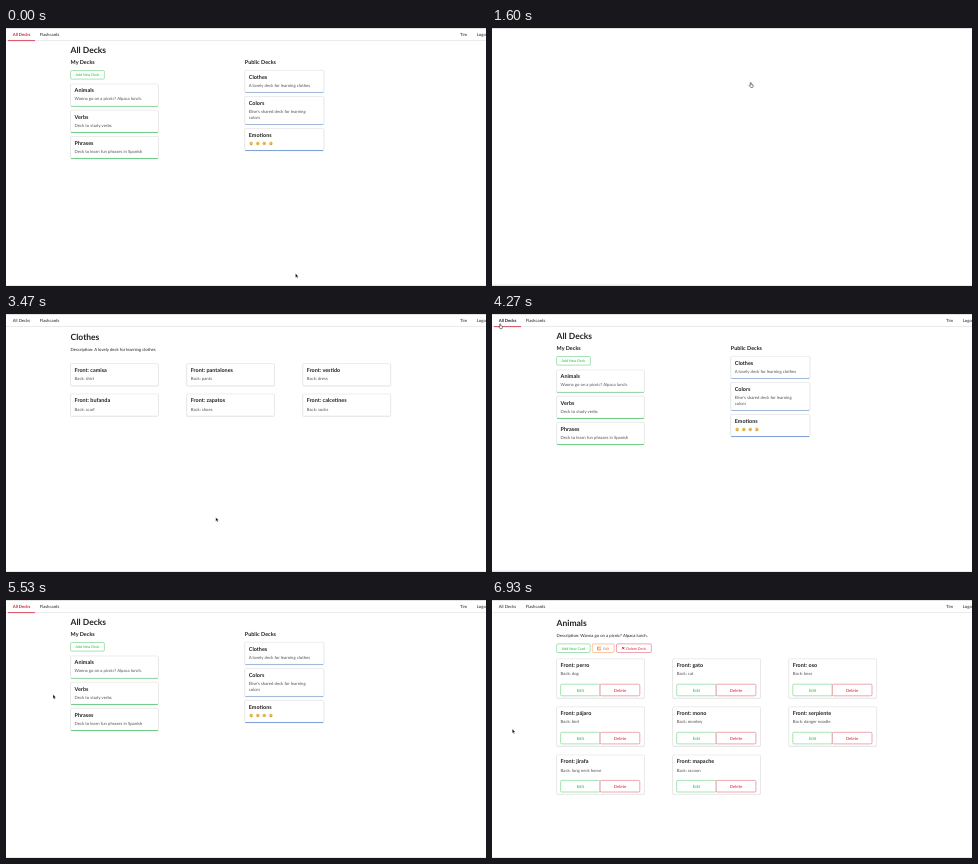
These frames come from a looping animation (480x258 px, 8.99 s). An HTML page:

```html
<!DOCTYPE html>
<html lang="en">
<head>
<meta charset="utf-8">
<title>Flashcard decks</title>
<style>
html, body { margin: 0; height: 100%; overflow: hidden; background: #fff; }
svg { display: block; width: 100vw; height: 100vh; }
text { font-family: Lato, "Open Sans", sans-serif; text-rendering: geometricPrecision; white-space: pre; }
</style>
</head>
<body>
<svg id="stage" viewBox="0 0 480 258"></svg>
<script>
const LOOP = 8990, STEP = 1000 / 15;
const GREEN = '#21ba45', RED = '#d4213d', ORANGE = '#f2711c', BLUE = '#3a72c8';
const INK = '#212121', SOFT = '#525252', LINE = '#d4d4d5';
const LEFT = 64.6, RIGHT = 238.8;
const stage = document.getElementById('stage');

const text = (x, y, s, size = 4.25, fill = INK, more = '') =>
  `<text x="${x}" y="${y}" font-size="${size}" fill="${fill}" ${more}>${s}</text>`;
const bold = (x, y, s, size = 5.46, fill = INK) => text(x, y, s, size, fill, 'font-weight="700"');
const rect = (x, y, w, h, fill, more = '') =>
  `<rect x="${x}" y="${y}" width="${w}" height="${h}" fill="${fill}" ${more}/>`;
const box = (x, y, w, h, color, width = .4) =>
  rect(x, y, w, h, '#fff', `rx="1.2" stroke="${color}" stroke-width="${width}"`);

function card(x, y, w, h, accent, lifted) {
  const shade = rect(x, y + .4, w, h, 'none',
    `rx="1.2" stroke="${lifted ? '#bcbdbd' : LINE}" stroke-width="1" opacity=".45"`);
  const edge = accent ? rect(x + .4, y + h - .1, w - .8, .65, accent, 'rx=".3" opacity=".8"') : '';
  return shade + box(x, y, w, h, LINE) + edge;
}

function button(x, y, w, h, label, color, size = 3.64, shift = 0) {
  return box(x, y, w, h, color) +
    text(x + w / 2 + shift, y + h / 2 + size * .36, label, size, color, 'text-anchor="middle"');
}

const decks = [
  [LEFT, 56, 87.8, 22, GREEN, 'Animals', 'Wanna go on a picnic? Alpaca lunch.'],
  [LEFT, 82.2, 87.8, 22, GREEN, 'Verbs', 'Deck to study verbs'],
  [LEFT, 108.4, 87.8, 22, GREEN, 'Phrases', 'Deck to learn fun phrases in Spanish'],
  [RIGHT, 42.3, 79, 22, BLUE, 'Clothes', 'A lovely deck for learning clothes'],
  [RIGHT, 68.5, 79, 27.8, BLUE, 'Colors', "Elise's shared deck for learning", 'colors'],
  [RIGHT, 100.4, 79, 22, BLUE, 'Emotions']
];
const inside = (p, [x, y, w, h]) => p.x > x && p.x < x + w && p.y > y && p.y < y + h;

function face(x, i) {
  const y = 115.4, bend = [1.3, -.3, -.7, .8][i];
  return `<circle cx="${x}" cy="${y}" r="1.85" fill="#f5d06c"/>
    <path d="M${x - 1} ${y - .5}h.6m.8 0h.6M${x - .9} ${y + .7}q.9 ${bend} 1.8 0" fill="none" stroke="#805622" stroke-width=".5"/>`;
}

function deckCard(deck, p) {
  const [x, y, w, h, accent, title, ...lines] = deck;
  const lifted = inside(p, deck);
  return `<g transform="translate(0 ${lifted ? -.9 : 0})">` + card(x, y, w, h, accent, lifted) +
    bold(x + 4, y + 8.4, title) +
    lines.map((s, i) => text(x + 4, y + 16.4 + i * 6, s, 4.25, SOFT)).join('') +
    (lines.length ? '' : [245.2, 251.8, 258.3, 264.9].map(face).join('')) + '</g>';
}

function nav(active, hovered) {
  const home = active ? bold(6.7, 8, 'All Decks', 4.25, hovered ? INK : RED) + rect(2, 12.3, 27, .8, RED)
    : text(6.7, 8, 'All Decks');
  return rect(0, 12.3, 480, .6, '#dedede') + home +
    text(33.8, 8, 'Flashcards') + text(454, 8, 'Tim') + text(470.8, 8, 'Logout');
}

const onNav = p => p.y < 13;

const deckPage = p => nav(true, onNav(p)) + bold(LEFT, 24.6, 'All Decks', 8.5) +
  bold(LEFT, 36.4, 'My Decks') + bold(RIGHT, 36.4, 'Public Decks') +
  button(LEFT, 42.5, 33.8, 8.6, 'Add New Deck', GREEN) +
  decks.map(d => deckCard(d, p)).join('');

const heading = (title, about) => nav() + bold(LEFT, 25.7, title, 8.5) + text(LEFT, 36.5, 'Description: ' + about);

// Words are "front/back" pairs laid out in three columns.
function wordCards(words, top, pitch, h, editable) {
  return words.split(',').map((pair, i) => {
    const [front, back] = pair.split('/');
    const x = LEFT + i % 3 * 116.1, y = top + Math.floor(i / 3) * pitch;
    return card(x, y, 87.8, h) + bold(x + 4, y + 8.4, 'Front: ' + front) +
      text(x + 4, y + 16.5, 'Back: ' + back, 4.25, SOFT) +
      (editable ? button(x + 4, y + 25.4, 39.5, 11.6, 'Edit', GREEN, 4.25) +
        button(x + 43.5, y + 25.4, 39.7, 11.6, 'Delete', RED, 4.25) : '');
  }).join('');
}

const clothesPage = () => heading('Clothes', 'A lovely deck for learning clothes') +
  wordCards('camisa/shirt,pantalones/pants,vestido/dress,bufanda/scarf,zapatos/shoes,calcetines/socks', 49.7, 30.3, 22);

const animalsPage = () => heading('Animals', 'Wanna go on a picnic? Alpaca lunch.') +
  button(LEFT, 43.9, 33.5, 8.6, 'Add New Card', GREEN) +
  button(100.3, 43.9, 21.8, 8.6, 'Edit', ORANGE, 3.64, 2.8) +
  `<path d="M107.5 47h-2v3h3v-1.4M106.8 48.8l2.3-2.4" fill="none" stroke="${ORANGE}" stroke-width=".7"/>` +
  button(124.5, 43.9, 34.9, 8.6, 'Delete Deck', RED, 3.64, 2.2) +
  `<path d="M130 47l2.4 2.4m0-2.4l-2.4 2.4" stroke="${RED}" stroke-width=".9"/>` +
  wordCards('perro/dog,gato/cat,oso/bear,pájaro/bird,mono/monkey,serpiente/danger noodle,jirafa/long neck horse,mapache/racoon',
    58.8, 48.1, 39.2, true);

const loadingPage = k => nav() + card(LEFT, 17.2, 340.4, 9) +
  `<g fill="none" stroke-width=".9"><circle cx="235" cy="18" r="4.4" stroke="#e3e3e3"/>
    <path d="M235 13.6a4.4 4.4 0 0 1 4.4 4.4" stroke="#767676" stroke-linecap="round" transform="rotate(${(k - 95) * 40} 235 18)"/></g>` +
  text(234.8, 29.6, 'Loading', 4.25, INK, 'text-anchor="middle"');

// First step of each view.
const views = [[0, deckPage], [24, null], [27, loadingPage], [30, clothesPage],
  [64, deckPage], [91, null], [94, loadingPage], [97, animalsPage]];

// Pointer stops: step, x, y.
const stops = [[0, 289.5, 245.5], [1, 289.5, 245.5], [4, 203.7, 160.7], [6, 203.7, 160.7],
  [17, 258.3, 54.5], [27, 258.3, 54.5], [32, 211, 205.5], [33, 209.8, 203.4], [52, 209.8, 203.4],
  [56, 78.7, 82.7], [58, 78.7, 82.7], [61, 7.7, 9.8], [74, 7.7, 9.8], [83, 47, 94.6],
  [86, 68, 88], [88, 69, 73.5], [93, 69, 73.5], [95, 66.7, 73.7], [104, 20.3, 129]];

function pointerAt(k) {
  const i = stops.findIndex(s => s[0] > k);
  if (i < 0) { const [, x, y] = stops.at(-1); return { x, y }; }
  const [k0, x0, y0] = stops[i - 1], [k1, x1, y1] = stops[i];
  const u = (k - k0) / (k1 - k0), e = u * u * (3 - 2 * u);
  return { x: x0 + (x1 - x0) * e, y: y0 + (y1 - y0) * e };
}

const pointers = {
  arrow: '<path d="M0 0V4.1L.95 3.2 1.6 4.7 2.3 4.4 1.65 2.9H2.9Z" fill="#000" stroke="#fff" stroke-width=".3"/>',
  hand: '<path d="M0 .4a.45.45 0 0 1 .9 0V1.8L2.8 2.3V3.6L2.3 4.9H.4L-1.1 3-.6 2.5 0 3Z" fill="#fff" stroke="#222" stroke-width=".55"/>',
  beam: '<path d="M-.9 0Q0 0 0 .6 0 0 .9 0M0 .5V4.3M-.9 4.8Q0 4.8 0 4.2 0 4.8 .9 4.8" fill="none" stroke="#222" stroke-width=".5"/>'
};

function draw(k) {
  const p = pointerAt(k), view = views.findLast(v => v[0] <= k)[1];
  const onLink = !view || onNav(p) || view === deckPage && decks.some(d => inside(p, d));
  const shape = onLink ? 'hand' : view === loadingPage && k > 90 ? 'beam' : 'arrow';
  const page = view === deckPage ? view(p) : view ? view(k) : '';
  stage.innerHTML = rect(0, 0, 480, 258, '#fff') + page +
    rect(0, 0, 480, .9, '#dedede') + rect(0, 257, 480, .8, '#e6e6e6') +
    (onLink ? rect(0, 256.7, 148, .8, '#dcdcdc') : '') +
    `<g transform="translate(${p.x} ${p.y})">${pointers[shape]}</g>`;
}

let shown = -1;
function tick() {
  const k = Math.floor((performance.now() % LOOP + 4) / STEP);
  if (k !== shown) draw(shown = k);
  requestAnimationFrame(tick);
}
tick();
</script>
</body>
</html>
```
